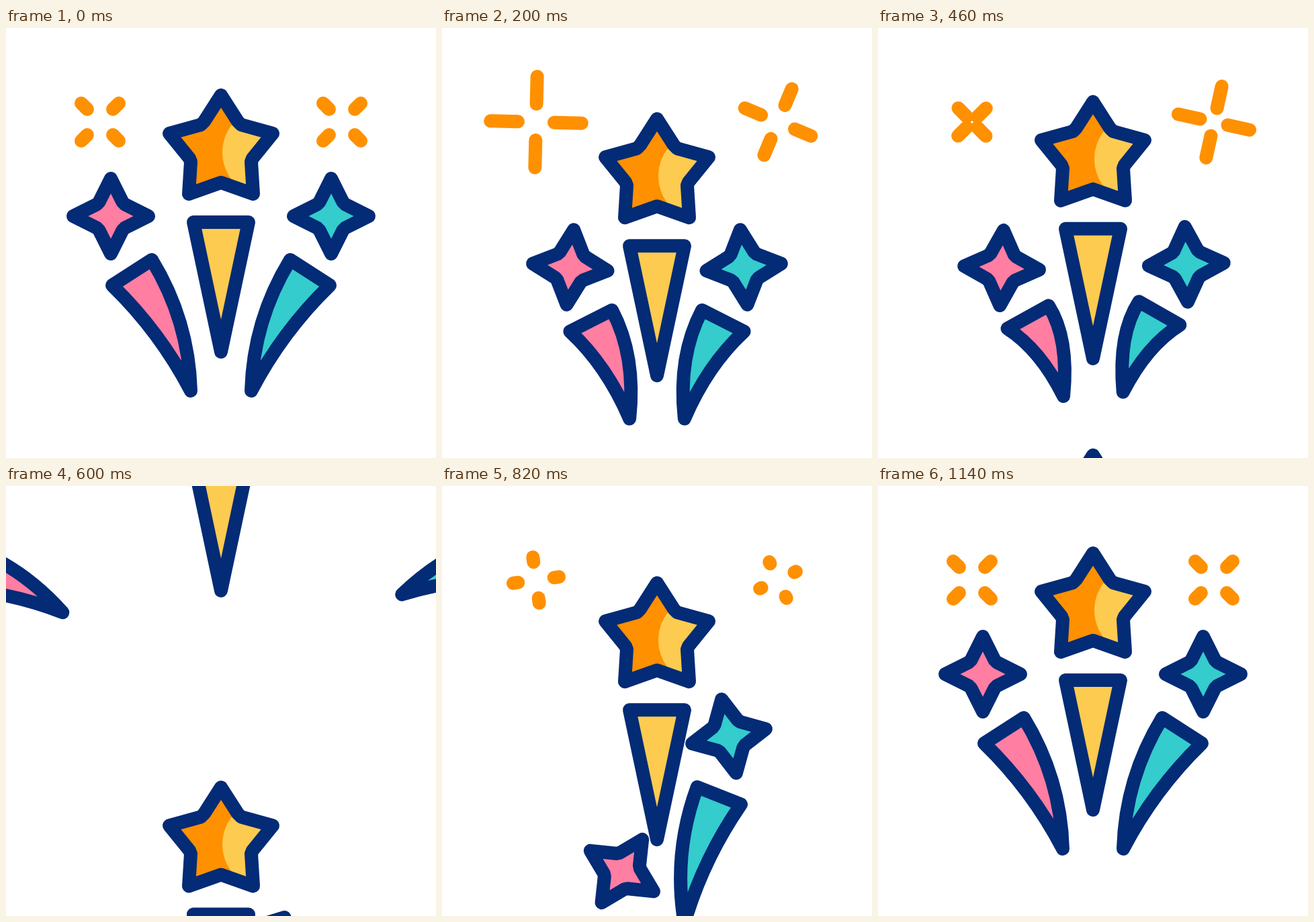
Animation of 640x640 px, one loop 1.8 s. Source, as an HTML page with a canvas:

```html
<!DOCTYPE html>
<html lang="en">
<head>
<meta charset="utf-8">
<title>Fireworks</title>
<style>
  html, body { margin: 0; width: 100%; height: 100%; overflow: hidden; background: #fff; }
  canvas { display: block; width: 100vmin; height: 100vmin; }
</style>
</head>
<body>
<canvas id="stage" width="640" height="640"></canvas>
<script>
const ctx = document.getElementById('stage').getContext('2d');
const LOOP = 1800;
const NAVY = '#032b76', ORANGE = '#ff9000', YELLOW = '#fdcb50', PINK = '#ff7ea2', TEAL = '#34cccd';
const PIVOT = { x: -287, y: 617 };

const rad = deg => deg * Math.PI / 180;
const mix = (a, b, p) => a + (b - a) * p;

// Smooth progress from 0 to 1 over the given span
function ease(t, start, span) {
  const s = Math.min(1, Math.max(0, (t - start) / span));
  return s * s * (3 - 2 * s);
}

function polygon(points) {
  const path = new Path2D();
  points.forEach(([x, y]) => path.lineTo(x, y));
  path.closePath();
  return path;
}

function outlined(path, color) {
  ctx.fillStyle = color;
  ctx.fill(path);
  ctx.stroke(path);
}

// Big star: right half from the top tip down, mirrored for the left half
const halfStar = [[320, 100], [345, 139], [350, 144], [397, 157], [367, 194], [365, 199], [368, 247], [320, 230]];
const bigStar = polygon([
  ...halfStar,
  ...halfStar.slice(1, -1).reverse().map(([x, y]) => [640 - x, y])
]);
const middleTrail = polygon([[279, 289], [361, 289], [320, 482]]);

const corner = [[0, -56], [17.5, -21], [21, -17.5]];
const smallStar = polygon([0, 1, 2, 3].flatMap(turn => corner.map(([x, y]) => {
  for (let i = 0; i < turn; i++) [x, y] = [-y, x];
  return [x, y];
})));

function drawMiddle(offset) {
  ctx.save();
  ctx.translate(0, offset);
  outlined(middleTrail, YELLOW);
  ctx.fillStyle = ORANGE;
  ctx.fill(bigStar);
  ctx.save();
  ctx.clip(bigStar);
  ctx.fillStyle = YELLOW;
  ctx.beginPath();
  ctx.arc(389, 185, 67, 0, 2 * Math.PI);
  ctx.fill();
  ctx.restore();
  ctx.stroke(bigStar);
  ctx.restore();
}

// Trail with its wide end pushed towards the tip by squash (0 to 1)
function sideTrail(squash) {
  const angle = rad(3.4 * squash), c = Math.cos(angle), s = Math.sin(angle);
  const cx = 187.5 + 38 * squash, cy = 364 + 68 * squash;
  const base = (x, y) => [cx + x * c - y * s, cy + x * s + y * c];
  const bend = (x, y) => [x + 12 * squash, y + 22 * squash];
  const path = new Path2D();
  path.moveTo(...base(-29.5, 19));
  path.lineTo(...base(29.5, -19));
  path.quadraticCurveTo(...bend(272, 435), 275, 540);
  path.quadraticCurveTo(...bend(229, 452), ...base(-29.5, 19));
  path.closePath();
  return path;
}

function drawSide(angle, squash, color) {
  ctx.save();
  ctx.translate(PIVOT.x, PIVOT.y);
  ctx.rotate(rad(angle));
  ctx.translate(-PIVOT.x, -PIVOT.y);
  outlined(sideTrail(squash), color);
  ctx.translate(156 + 28 * squash, 280 + 81 * squash);
  ctx.rotate(rad(2.3 * squash));
  outlined(smallStar, color);
  ctx.restore();
}

function drawSpark(angle, inner, outer) {
  ctx.save();
  ctx.translate(140, 140);
  ctx.rotate(rad(angle + 45));
  ctx.strokeStyle = ORANGE;
  ctx.beginPath();
  for (let i = 0; i < 4; i++) {
    ctx.moveTo(inner, 0);
    ctx.lineTo(outer + 0.01, 0);
    ctx.rotate(Math.PI / 2);
  }
  ctx.stroke();
  ctx.restore();
}

const left = {
  color: PINK, lift: 76.6, arc: 92, landing: 1121, arcSpan: 745,
  grow: 0, shrink: 350, rebirth: 620, rebirthSpan: 360,
  spin: t => 46 * Math.pow(t / 200, 1.637)
};
const right = {
  color: TEAL, lift: 83.3, arc: 90, landing: 1000, arcSpan: 812,
  grow: 88, shrink: 400, rebirth: 700, rebirthSpan: 400,
  spin: t => 22 * Math.pow(Math.max(0, t - 70) / 130, 1.56)
};

function spark(t, side) {
  if (t < side.shrink + 190) {
    const scale = 1 - ease(t, side.shrink, 200);
    const outer = mix(39.6, 70, ease(t, side.grow, 240));
    drawSpark(side.spin(t), 27 * scale, outer * scale);
  } else if (t > side.rebirth) {
    const p = ease(t, side.rebirth, side.rebirthSpan);
    drawSpark(90 * (1 - p), 27, mix(27, 39.6, p));
  }
}

function sideGroup(t, side, dip, launch) {
  spark(t, side);
  if (t < 739) {
    const squash = dip * (1 - ease(t, 395, 290));
    drawSide(8.2 * dip - side.lift * launch, squash, side.color);
  }
  const rest = 1 - ease(t, side.landing - side.arcSpan, side.arcSpan);
  if (t > 450) drawSide(side.arc * rest, 0, side.color);
}

function draw(t) {
  const dip = ease(t, 0, 395), launch = ease(t, 395, 344);
  ctx.fillStyle = '#fff';
  ctx.fillRect(0, 0, 640, 640);
  ctx.lineWidth = 20;
  ctx.lineJoin = ctx.lineCap = 'round';
  ctx.strokeStyle = NAVY;

  sideGroup(t, left, dip, launch);
  ctx.save();
  ctx.transform(-1, 0, 0, 1, 640, 0);
  sideGroup(t, right, dip, launch);
  ctx.restore();

  if (t < 739) drawMiddle(68.7 * dip - 611 * launch);
  if (t > 353) drawMiddle(593 * (1 - ease(t, 353, 562)));
}

const began = performance.now();
function tick() {
  draw((performance.now() - began) % LOOP);
  requestAnimationFrame(tick);
}
tick();
</script>
</body>
</html>
```
